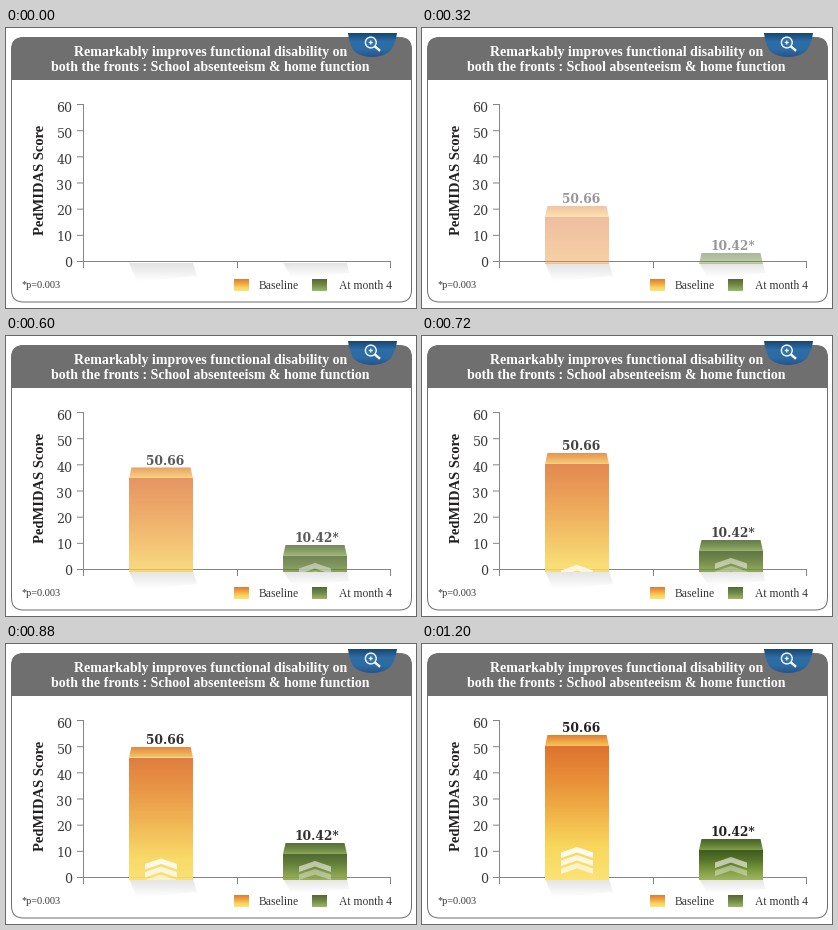
These frames come from a looping animation (410 by 280 pixels, 8000 ms). A matplotlib script:

```python
import matplotlib.pyplot as plt
import numpy as np
from matplotlib.animation import FuncAnimation
from matplotlib.colors import LinearSegmentedColormap
from matplotlib.patches import Circle, FancyBboxPatch, PathPatch, Polygon, Rectangle
from matplotlib.path import Path

W, H, DPI = 410, 280, 80
STEP, LOOP = 40, 8000       # ms
START, RISE = 80, 1200      # ms
FLOOR = 236                 # bars rise from below this line
LID = 11                    # height of a bar's lid
AXIS_X, AXIS_Y = 77.5, 233.5
UNIT = 157 / 60             # pixels per score point

GREY = "#6f6f6f"
AXIS = "#858585"
INK = "#231f20"
SOFT_INK = "#3a3637"
ORANGE = ["#de7230", "#e98f38", "#f1b248", "#f8d75c", "#fbe375"]
GREEN = ["#3f5a20", "#577529", "#7c993f", "#a2b662"]

fig = plt.figure(figsize=(W / DPI, H / DPI), dpi=DPI, facecolor="white")


def layer(bottom):
    """Transparent axes in pixel units, from the stage top down to `bottom`."""
    ax = fig.add_axes([0, 1 - bottom / H, 1, bottom / H])
    ax.axis("off")
    ax.set(xlim=(0, W), ylim=(bottom, 0))
    return ax


def write(ax, x, y, s, px, color=INK, family="Liberation Serif", **kw):
    return ax.text(x, y, s, fontsize=px * 72 / DPI, color=color,
                   family=family, **kw)


def gradient(ax, points, colors, z=2):
    """Fill a polygon with a vertical gradient, first colour on top."""
    xs, ys = zip(*points)
    shape = Polygon(points, fc="none", ec="none")
    ax.add_patch(shape)
    ramp = LinearSegmentedColormap.from_list("ramp", colors)
    img = ax.imshow(ramp(np.linspace(0, 1, 128))[:, None, :3],
                    extent=(min(xs), max(xs), max(ys), min(ys)),
                    aspect="auto", interpolation="bilinear", zorder=z)
    img.set_clip_path(shape)
    return img


def box(x0, y0, x1, y1):
    return [(x0, y0), (x1, y0), (x1, y1), (x0, y1)]


def line(ax, xs, ys, color=AXIS, width=1, z=2):
    ax.plot(xs, ys, color=color, lw=width * 72 / DPI, zorder=z,
            solid_capstyle="butt", snap=False)


def draw_panel(ax):
    panel = FancyBboxPatch((5.5, 9.5), 400, 264.5, fc="white", ec=GREY,
                           lw=0.9, zorder=1, snap=False,
                           boxstyle="round,pad=0,rounding_size=12")
    ax.add_patch(panel)
    header = Rectangle((5, 9), 402, 42.5, fc=GREY, ec="none", zorder=1.5)
    ax.add_patch(header)
    header.set_clip_path(panel)
    title = dict(ha="center", color="white", weight="bold", zorder=3)
    write(ax, 205, 28, "Remarkably improves functional disability on",
          13.9, **title)
    write(ax, 204.7, 43, "both the fronts : School absenteeism & home function",
          13.85, **title)


def draw_zoom_tab(ax):
    verts = [(342, 5), (391, 5), (390, 14), (385, 22), (378, 29), (366, 29),
             (354, 29), (347, 22), (343, 14), (342, 5)]
    codes = [Path.MOVETO, Path.LINETO] + [Path.CURVE3] * 8
    tab = PathPatch(Path(verts, codes), fc="none", ec="none")
    ax.add_patch(tab)
    img = gradient(ax, box(342, 5, 391, 30),
                   ["#1a4470", "#2c6ea6", "#2d6ba3", "#274f88"], z=4)
    img.set_clip_path(tab)
    ax.add_patch(Circle((364.8, 14.5), 5.4, fc="#2f74ad", ec="white",
                        lw=1.2, zorder=5))
    line(ax, [362.8, 366.8], [14.5, 14.5], "white", 1.2, 6)
    line(ax, [364.8, 364.8], [12.5, 16.5], "white", 1.2, 6)
    line(ax, [368.6, 374], [18.2, 22.8], "white", 2.4, 6)


def draw_chart(ax):
    line(ax, [AXIS_X, AXIS_X], [76, 240])
    line(ax, [71, 385], [AXIS_Y, AXIS_Y])
    for x in (231.5, 384.5):
        line(ax, [x, x], [AXIS_Y, 240])
    for value in range(0, 61, 10):
        y = AXIS_Y - value * UNIT
        line(ax, [71, AXIS_X], [y, y])
        write(ax, 66.7, 238.8 - value * 2.575, str(value), 12.6,
              color="#3a3a3a", family="DejaVu Serif", ha="right")
    write(ax, 38, 152.2, "PedMIDAS Score", 14.5, weight="bold", rotation=90,
          rotation_mode="anchor", ha="center")

    fade = ["#e4e4e4", "#f1f1f1", "#ffffff"]
    gradient(ax, [(123, 235), (187, 235), (191, 248), (131, 253)], fade, 1.8)
    gradient(ax, [(277, 235), (341, 235), (343, 245), (286, 249)], fade, 1.8)

    write(ax, 15, 259.5, "*p=0.003", 10.3, SOFT_INK)
    gradient(ax, box(228, 250.5, 243, 263), ORANGE)
    gradient(ax, box(306, 250.5, 321, 263), ["#4f6432", "#6f8745", "#a2b662"])
    write(ax, 253, 261, "Baseline", 11.6, SOFT_INK)
    write(ax, 333, 261, "At month 4", 11.6, SOFT_INK)


def chevron(ax, x, y, alpha):
    half, drop, thick = 16, 5.5, 5.5
    points = [(x, y), (x + half, y + drop), (x + half, y + drop + thick),
              (x, y + thick), (x - half, y + drop + thick),
              (x - half, y + drop)]
    arrow = Polygon(points, fc="white", ec="none", alpha=alpha, zorder=3)
    ax.add_patch(arrow)
    return arrow


class Bar:
    """A lidded bar that rises through the floor while it fades in."""

    def __init__(self, x0, x1, top, travel, lid, front, arrows, label, label_x):
        self.travel = travel
        self.ax = ax = layer(FLOOR)
        edge = top + LID
        mid = (x0 + x1) / 2
        self.parts = [
            gradient(ax, [(x0 + 2.5, top), (x1 - 2.5, top), (x1, edge),
                          (x0, edge)], lid),
            gradient(ax, box(x0, edge, x1, FLOOR), front),
        ]
        self.parts += [chevron(ax, mid, y, a) for y, a in arrows]
        self.parts.append(write(ax, label_x, top - 2.7, label, 12.2,
                                family="DejaVu Serif", weight="bold",
                                ha="center", zorder=4))
        self.alphas = [p.get_alpha() or 1 for p in self.parts]
        ax.set_xlim(0, W)

    def pose(self, eased):
        drop = self.travel * (1 - eased)
        self.ax.set_ylim(FLOOR - drop, -drop)
        for part, alpha in zip(self.parts, self.alphas):
            part.set_alpha(alpha * eased)


base = layer(H)
draw_panel(base)
draw_zoom_tab(base)
draw_chart(base)
base.set(xlim=(0, W), ylim=(H, 0))

bars = [
    Bar(123, 187, 91, 161.8, ["#e0802f", "#eda044", "#f6c65a"], ORANGE,
        [(203, 0.92), (211, 0.8), (219, 0.65)], "50.66", 159.3),
    Bar(277, 341, 195, 55.8, ["#48632a", "#5f7d34", "#83a04c"], GREEN,
        [(213, 0.6), (221, 0.4)], "10.42*", 311),
]


def update(i):
    t = i * STEP
    u = min(t / RISE, 1) if t >= START else 0
    eased = 1 - (1 - u) ** 2
    for bar in bars:
        bar.pose(eased)


anim = FuncAnimation(fig, update, frames=LOOP // STEP, interval=STEP,
                     init_func=lambda: update(0), repeat=True, repeat_delay=0)
plt.show()
```
